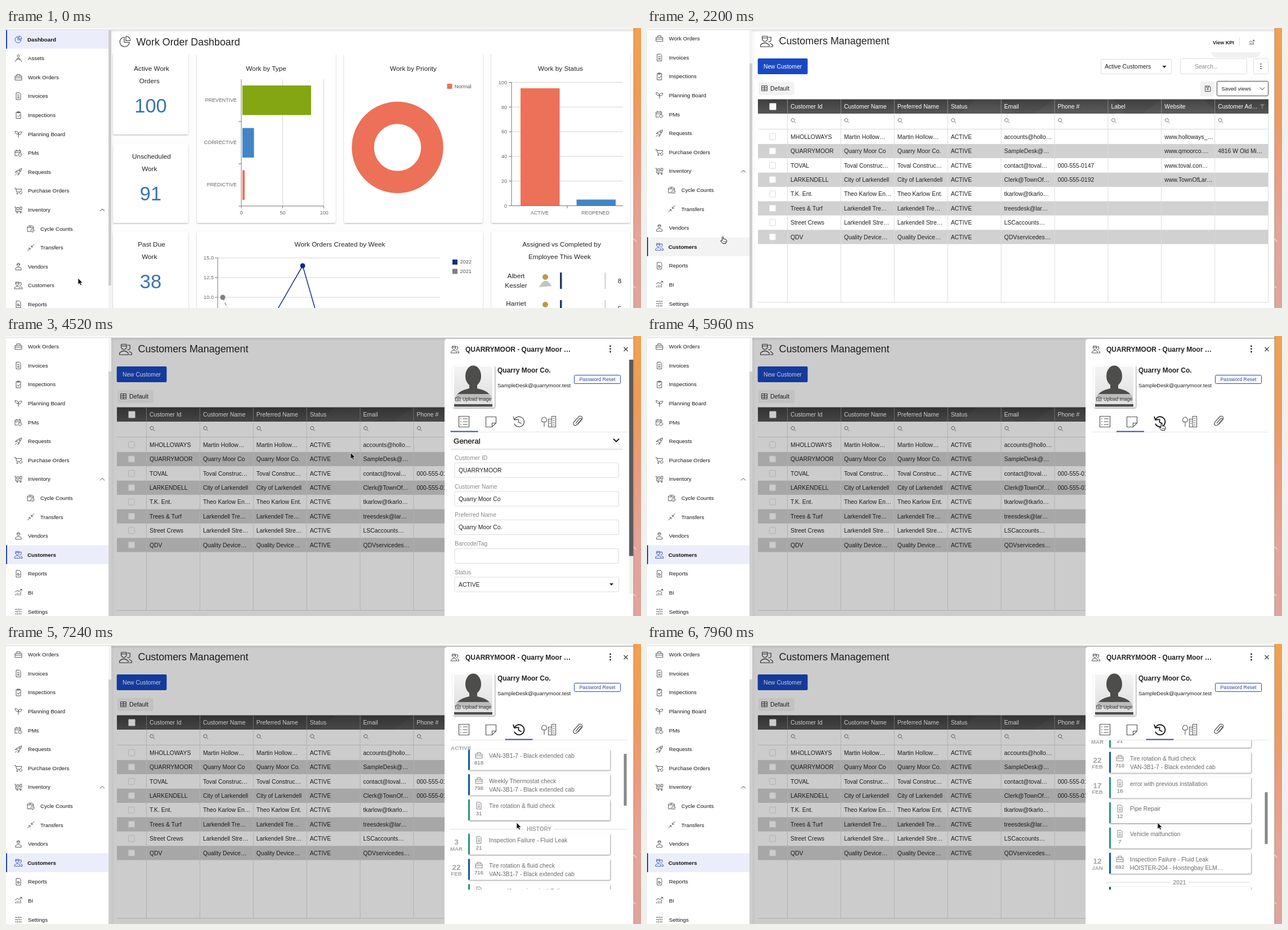
Recreate the animation shown at these times as an HTML page. Size 1128 px wide and 497 px high, loop 8000 ms.

```html
<!DOCTYPE html>
<html lang="en">
<head>
<meta charset="utf-8">
<title>Customer records</title>
<style>
html,body{margin:0;width:100%;height:100%;overflow:hidden;background:#fff}
svg{display:block;width:1128px;height:497px;font-family:"Liberation Sans",Arial,sans-serif}
</style>
</head>
<body>
<svg id="stage" viewBox="0 0 1128 497"></svg>
<script>
const LOOP = 8000;
const text = (x, y, s, size = 10.4, fill = '#222', extra = '') =>
  `<text x="${x}" y="${y + size * .36}" font-size="${size}" fill="${fill}" ${extra}>${s.replace(/&/g, '&amp;')}</text>`;
const mid = (x, y, s, size, fill, extra = '') => text(x, y, s, size, fill, 'text-anchor="middle" ' + extra);
const end = (x, y, s, size, fill) => text(x, y, s, size, fill, 'text-anchor="end"');
const bold = 'font-weight="700"';
const rect = (x, y, w, h, fill, extra = '') => `<rect x="${x}" y="${y}" width="${w}" height="${h}" fill="${fill}" ${extra}/>`;
const line = (d, stroke = '#888', w = 1, extra = '') => `<path d="${d}" fill="none" stroke="${stroke}" stroke-width="${w}" ${extra}/>`;
const group = (id, body, extra = '') => `<g id="${id}" ${extra}>${body}</g>`;
const range = n => [...Array(n).keys()];

const icons = {
  pie: 'M-1-5A5.5 5.5 0 1 0 5 1H-1ZM1-6A5 5 0 0 1 6-1H1Z',
  asset: 'M0-6a2 2 0 1 0 .1 0M-6 6L-2 0H2L6 6M-3 3L0 1L3 3',
  work: 'M-6-2H6V5H-6ZM-3-2V-5H3V-2M-6 1H6',
  doc: 'M-4-6H2L4-4V6H-4ZM-2-2H2M-2 1H2M-2 3H2',
  check: 'M-4-5H4V6H-4ZM-2-6H2V-4H-2ZM-2 1L0 3L3-1',
  plant: 'M0 6V0Q-6 1-6-5Q0-5 0 0Q0-4 6-4Q6 1 0 1',
  calendar: 'M4-1V-4H-6V5H-1M-6-1H4M-3-6V-3M2-6V-3M3 0a3 3 0 1 0 .1 0M3 2V3H4',
  rocket: 'M6-6Q0-5-3 0L0 3Q5 0 6-6ZM-3 0L-6 1L-2-3M0 3L-1 6L3 2M-6 6L-3 3M2-3a1 1 0 1 0 .1 0',
  cart: 'M-7-5H-5L-3 2H2M-4-3H6L5 0M-2 4a1 1 0 1 0 .1 0M4 1a2.3 2.3 0 1 0 .1 0',
  stock: 'M-7-5H-5V3H6M-3-4H1V0H-3ZM3-5H6V0H3ZM-2 4a1 1 0 1 0 .1 0M4 4a1 1 0 1 0 .1 0',
  cycle: 'M0 5H-6V-3L-4-5H3L5-3V0M-6-2H5M-1-5V-2M3 0a3 3 0 1 0 .1 0M2 3L3 4L5 2',
  transfer: 'M6-6L1-1M1-4V-1H4M-6 6L-1 1M-1 4V1H-4',
  person: 'M0-6a2.6 2.6 0 1 0 .1 0M-3-4H3M-5 6V3Q0-1 5 3V6Z',
  people: 'M-5-6H1V-2Q-2 2-5-2ZM-5-4H1M-7 6V4Q-2-1 3 4V6ZM2-5H5V-1Q4 1 2 0M4 2L7 4V6H4',
  report: 'M-4-6H2L4-4V6H-4ZM0-1a2 2 0 1 0 2 2H0Z',
  chart: 'M-5 5V2M-2 5V0M1 5V1M4 5V-2M-6-1L-2-4L1-2L6-6M3-6H6V-3',
  sliders: 'M-6-4H-1M2-4H6M-6 0H1M4 0H6M-6 4H-3M0 4H6M.5-5.5v3M2.5-1.5v3M-1.5 2.5v3'
};
const icon = (name, x, y, scale = 1, color = '#444') =>
  line(icons[name], color, .9 / Math.sqrt(scale), `transform="translate(${x} ${y}) scale(${scale})" stroke-linejoin="round"`);

// Sidebar
const menu = ['Dashboard pie', 'Assets asset', 'Work Orders work', 'Invoices doc', 'Inspections check', 'Planning Board plant',
  'PMs calendar', 'Requests rocket', 'Purchase Orders cart', 'Inventory stock', 'Cycle Counts cycle', 'Transfers transfer',
  'Vendors person', 'Customers people', 'Reports report', 'BI chart', 'Settings sliders'];
function menuItem(entry, i) {
  const cut = entry.lastIndexOf(' '), label = entry.slice(0, cut), y = 20.2 + 33.6 * i;
  const nested = i === 10 || i === 11;
  const plain = icon(entry.slice(cut + 1), nested ? 44 : 22, y) + text(nested ? 61 : 39, y, label, 9.7, '#18181c');
  if (i !== 0 && i !== 13) return plain;
  const active = rect(0, y - 17, 182, 33.5, '#ebeefa', `id="bg${i}"`) + rect(0, y - 17, 2, 33.5, '#2547b5') +
    icon(entry.slice(cut + 1), 22, y, 1, '#2547b5') + text(38, y, label, 9.75, '#111', bold);
  return group('plain' + i, plain) + group('active' + i, active);
}
const sidebar = rect(0, 3, 187, 494, '#fff') +
  `<g clip-path="url(#sideClip)">` +
  group('menu', menu.map(menuItem).join('') + line('M167 325L171 321L175 325', '#444')) + '</g>' +
  rect(182, 3, 5, 494, '#f3f3f3') + rect(182, 4, 5, 453, '#cdcdcf', 'id="sideThumb"');

// Dashboard
const card = (x, y, w, h) => rect(x, y, w, h, '#fff', 'rx="3" filter="url(#soft)"');
const stat = (y, a, b, n) => mid(258.5, y, a, 11.8) + mid(254.8, y + 21.5, b, 11.8) + mid(257, y + 66, n, 34.5, '#3b73ae');
const orange = '#ec7158', blue = '#4285c6', axis = '#777';
const employee = (y, first, last, n) => mid(906, y, first, 11.8) + mid(906, y + 17, last, 11.8) +
  `<circle cx="958" cy="${y + 2}" r="5" fill="#b79a4d"/><path d="M947 ${y + 20}Q958 ${y - 2} 969 ${y + 18}Z" fill="#c4c4c4"/>` +
  rect(984, y - 6, 3.5, 29, '#213c63') + rect(1063, y - 6, 3, 29, '#dddde9') + mid(1090, y + 9, n, 11.8);
const dashboard = rect(187, 3, 928, 494, '#fdfdfd') +
  card(190, 44, 134, 145) + card(190, 205, 134, 141) + card(190, 361, 134, 160) +
  [339, 600.5, 862].map(x => card(x, 44, 246.5, 302)).join('') + card(339, 361, 508, 160) + card(862, 361, 246.5, 160) +
  rect(187, 8, 928, 39, '#fff') + icon('pie', 211.5, 24, 1.55, '#333') + text(231.5, 25, 'Work Order Dashboard', 17.85) +
  stat(72, 'Active Work', 'Orders', '100') + stat(228, 'Unscheduled', 'Work', '91') + stat(384, 'Past Due', 'Work', '38') +
  mid(462, 72, 'Work by Type', 11.8) + mid(723.5, 72, 'Work by Priority', 11.8) + mid(985, 72, 'Work by Status', 11.8) +
  mid(593, 384, 'Work Orders Created by Week', 11.8) +
  mid(987, 384, 'Assigned vs Completed by', 11.8) + mid(983.5, 405.5, 'Employee This Week', 11.8) +
  line('M491.5 91V316M564.5 91V316', '#d4d4d4') +
  rect(420, 102, 122, 52.5, '#84a612') + rect(420, 177.5, 20.5, 52.5, blue) + rect(420, 252.5, 4, 52.5, orange) +
  line('M418 91V320M413 166H418M413 241H418M413 316H565M491.5 316V320M564.5 316V320', axis) +
  ['PREVENTIVE', 'CORRECTIVE', 'PREDICTIVE'].map((s, i) => end(410, 128 + 75 * i, s, 8.9, '#666')).join('') +
  ['0', '50', '100'].map((s, i) => mid(418 + 73.5 * i, 328, s, 9.1, '#666')).join('') +
  `<circle cx="695.5" cy="212" r="61.5" fill="none" stroke="${orange}" stroke-width="39.5"/>` +
  rect(783.5, 99, 9, 9, orange) + text(797, 104, 'Normal', 9.2, '#555') +
  range(5).map(i => line(`M898 ${96.5 + 43.8 * i}H1096`, '#d4d4d4')).join('') +
  range(6).map(i => line(`M893 ${96.5 + 43.8 * i}H898`, axis) + end(890, 96.5 + 43.8 * i, '' + (100 - 20 * i), 9.1, '#666')).join('') +
  rect(914, 107, 69.5, 208.5, orange) + rect(1013.5, 304.5, 69.5, 11, blue) +
  line('M898 96V315.5H1096M997 315V320', axis) +
  mid(948, 328, 'ACTIVE', 8.9, '#666') + mid(1047, 328, 'REOPENED', 8.9, '#666') +
  ['15.0', '12.5', '10.0'].map((s, i) => line(`M376 ${408 + 35 * i}H771`, '#d4d4d4') +
    line(`M371 ${408 + 35 * i}H376`, axis) + end(369, 408 + 35 * i, s, 9.2, '#666')).join('') +
  line('M376 408V497', axis) +
  line('M479 505L527 422L551 505', '#12307f', 1.5) + line('M385 478L395 502', '#888', 1.4, 'stroke-dasharray="6 4"') +
  '<circle cx="527" cy="422" r="4.5" fill="#12307f"/><circle cx="385" cy="478" r="4.5" fill="#808080"/>' +
  rect(793, 411, 9, 9, '#12307f') + text(806.5, 415, '2022', 9.2, '#555') +
  rect(793, 427.5, 9, 9, '#808080') + text(806.5, 432, '2021', 9.2, '#555') +
  employee(440, 'Albert', 'Kessler', '8') + employee(489, 'Harriet', 'Lowe', '5');

// Customers page
const colX = i => 249.5 + 94.9 * i;
const headers = ['Customer Id', 'Customer Name', 'Preferred Name', 'Status', 'Email', 'Phone #', 'Label', 'Website', 'Customer Ad…'];
const customers = [
  'MHOLLOWAYS|Martin Hollow…|Martin Hollow…|accounts@hollo…|||www.holloways_…',
  'QUARRYMOOR|Quarry Moor Co|Quarry Moor Co.|SampleDesk@…|||www.qmoorco.…|4816 W Old Mi…',
  'TOVAL|Toval Construc…|Toval Construc…|contact@toval…|000-555-0147||www.toval.con…',
  'LARKENDELL|City of Larkendell|City of Larkendell|Clerk@TownOf…|000-555-0192||www.TownOfLar…',
  'T.K. Ent.|Theo Karlow En…|Theo Karlow Ent.|tkarlow@tkarlo…',
  'Trees & Turf|Larkendell Tre…|Larkendell Tre…|treesdesk@lar…',
  'Street Crews|Larkendell Stre…|Larkendell Stre…|LSCaccounts…',
  'QDV|Quality Device…|Quality Device…|QDVservicedes…'
];
function customerRow(row, i) {
  const cells = row.split('|'), y = 193 + 25.4 * i;
  cells.splice(3, 0, 'ACTIVE');
  return (i % 2 ? rect(197, y - 12.5, 907, 25.2, '#d1d1d1') : '') +
    rect(217.5, y - 5.5, 11, 11, '#fff', `rx="1" stroke="${i % 2 ? '#e4e4e4' : '#ddd'}"`) +
    cells.map((s, c) => text(colX(c) + 5.5, y, s)).join('');
}
const columnLines = range(10).map(i => `M${colX(i)} 152V487`).join('');
const customersPage = rect(187, 3, 928, 494, '#fff') + icon('people', 212.5, 24, 1.55, '#333') +
  text(234.5, 23, 'Customers Management', 17.9) +
  group('tools',
    rect(196.7, 54, 88.7, 28, '#1949c2', 'rx="2"') + mid(241, 68, 'New Customer', 10.3, '#fff') +
    rect(198, 96, 64, 23, '#f2f2f2', 'rx="4"') +
    line('M203.5 102.5h10v9h-10zM203.5 105.5h10M203.5 108.5h10M208.5 102.5v9', '#444') + text(219, 107.5, 'Default', 10.7) +
    text(1005, 25.5, 'View KPI', 9, '#222', bold) + line('M1052.5 16V33', '#ddd') + icon('chart', 1074, 26, .75, '#333') +
    '<path d="M1002 43H1090Q1088 53 1076 53H1016Q1004 53 1002 43Z" fill="#f1f1f1"/>' +
    rect(806.5, 55.5, 125, 26, '#fff', 'rx="2" stroke="#ddd"') + text(813, 68.5, 'Active Customers', 10.5) +
    '<path d="M915.5 67h7l-3.5 4z" fill="#222"/>' +
    rect(947.5, 54.5, 118, 27, '#fff', 'rx="2" stroke="#ddd"') + text(973, 68, 'Search...', 10.3, '#888') +
    rect(1077.5, 54.5, 26, 27, '#fff', 'rx="2" stroke="#ddd"') +
    [64, 68, 72].map(y => `<circle cx="1090.5" cy="${y}" r="1" fill="#222"/>`).join('') +
    rect(983, 95, 25, 26, '#f1f1f1', 'id="saveHover" rx="3"') +
    line('M991.5 103h7.5l2 2v7.5h-9.5zM994 103v3h4v-3M996 107.5a1.3 1.3 0 1 0 .1 0', '#444') +
    rect(1012.5, 94.5, 91, 26, '#fff', 'rx="2" stroke="#444"') + text(1020.5, 108, 'Saved views', 9.4) +
    line('M1089 105.5L1093 109.5L1097 105.5', '#333') +
    rect(197, 126.5, 907, 25.5, 'url(#head)') +
    '<path d="M555 152L585 127H629L655 152ZM688 152L722 127H830L850 152ZM880 152L915 127H990L1015 152Z" fill="#fff" opacity=".03"/>' +
    line(range(9).map(i => `M${colX(i)} 127V152`).join(''), '#8a8a8a') +
    rect(217.5, 133.5, 12, 12, '#fff', 'rx="1"') +
    '<path d="M1088.5 135h9l-3.5 4v5l-2-1v-4z" fill="#777"/>' +
    headers.map((s, i) => text(colX(i) + 5.5, 139.5, s, 10.4, '#fff') +
      line(`M${colX(i) + 12.3} 164.8a3 3 0 1 0-1 1.2M${colX(i) + 11.5} 165.5l3 3`, '#666')).join('')) +
  group('rows', customers.map(customerRow).join('')) +
  group('gridLines', line(columnLines, '#dcdcdc') + line('M197 179.5H1104M197 487H1104', '#d8d8d8'));

// Detail panel
const cameraIcon = line('M798.5 109.5h2l1-1.5h3l1 1.5h1.5v5.5h-8.5zM803 110.5a1.6 1.6 0 1 0 .1 0', '#333', .8);
const field = (y, label, value) => text(797, y - 22, label, 10.4, '#8a8a8a') +
  rect(797, y - 13, 291.5, 26, '#fff', 'rx="2" stroke="#ddd"') + text(804, y, value);
const tabs = line('M804.5 142.5h18v19h-18zM807 147h2M811.5 147h8.5M807 152h2M811.5 152h8.5M807 157h2M811.5 157h8.5', '#555', 1.2) +
  line('M852.5 143.5h18v11l-7 7h-11zM870.5 154.5h-7v7', '#555', 1.2) +
  line('M903.5 148A9 9 0 1 1 903 155.5M901 143l2 6 6-1M910.5 147v6l5 2.5', '#555', 1.3, 'id="clock"') +
  line('M956 161v-9M953 152.5q-3-3 0-7q3-3 6 0q3 4 0 7zM963.5 161.5v-14h6v14zM969.5 161.5v-19h7v19zM965 151h3M965 155h3M971.5 146h3M971.5 150h3M971.5 154h3M971.5 158h3', '#555', 1.1) +
  line('M1012 155l7-8.5q2-1.5 3 .5q.5 1-7.5 10q-3 3-5.5 1q-2.5-2.5 0-5.5l8.5-9.5q3-2 5.5.5q2 2.5-.5 5.5l-7 8', '#555', 1.2);
const avatar = rect(793, 52, 75, 75, '#fff', 'rx="3" filter="url(#lift)"') + rect(796, 54, 68, 71, 'url(#photo)') +
  '<ellipse cx="830" cy="71" rx="14" ry="18.5" fill="#4d4d4b"/><path d="M823 80H837V93Q861 98 863 112H797Q800 98 823 93Z" fill="#4d4d4b"/>' +
  rect(796, 103, 68, 19, '#e2e2e2', 'opacity=".75"') + rect(796, 121, 68, 4.5, '#4d4d4d') +
  cameraIcon + text(811, 112, 'Upload Image', 8.2);
const form = text(795, 186, 'General', 13.4, '#111', 'stroke="#111" stroke-width=".25"') +
  line('M1079 182.5L1084 187.5L1089 182.5', '#111', 1.8) +
  rect(790, 200, 306, 1, '#ddd') + rect(790, 201, 306, 2, '#f3f3f3') +
  field(238, 'Customer ID', 'QUARRYMOOR') + field(289, 'Customer Name', 'Quarry Moor Co') +
  field(339.5, 'Preferred Name', 'Quarry Moor Co.') + field(390.5, 'Barcode/Tag', '') + field(441, 'Status', 'ACTIVE') +
  '<path d="M1072 439h7l-3.5 4z" fill="#222"/>' +
  rect(1107, 42, 7.5, 416, '#efefef') + rect(1107, 42, 7.5, 348.5, '#5b5b5b');

// History entries: y, kind, id, first line, second line, day, month
const history = [
  [198.5, 'work', 818, 'VAN-3B1-7 - Black extended cab'],
  [243.3, 'work', 798, 'Weekly Thermostat check', 'VAN-3B1-7 - Black extended cab'],
  [288, 'doc', 31, 'Tire rotation & fluid check'],
  [348.8, 'doc', 21, 'Inspection Failure - Fluid Leak', '', '3', 'MAR'],
  [393.5, 'work', 716, 'Tire rotation & fluid check', 'VAN-3B1-7 - Black extended cab', '22', 'FEB'],
  [438.3, 'doc', 16, 'error with previous installation', '', '17', 'FEB'],
  [483, 'doc', 12, 'Pipe Repair'],
  [527.8, 'doc', 7, 'Vehicle malfunction'],
  [572.6, 'work', 692, 'Inspection Failure - Fluid Leak', 'HOISTER-204 - Hoistingbay ELM…', '12', 'JAN'],
  [633, 'work', 688, 'Weekly Thermostat check']
];
const grey = '#a3a3a3';
const entry = ([y, kind, id, a, b = '', day = '', month = '']) =>
  rect(821, y - 11.5, 252, 37, '#fff', 'rx="2" filter="url(#lift)"') +
  rect(821, y - 11.5, 3, 37, kind === 'work' ? '#0e58a3' : '#2a957f') +
  icon(kind, 840, y - .5, 1, '#777') + mid(840, y + 13, '' + id, 9.6, '#666') +
  text(858, y, a, 10.4, '#6c6c6c') + text(858, y + 15, b, 10.4, '#6c6c6c') +
  mid(800, y + 3, day, 13.5, grey, bold) + mid(800, y + 15, month, 9.7, grey, bold);
const historyList = history.map(entry).join('') + text(790, 184.5, 'ACTIVE', 9.9, grey, bold) +
  line('M790 329.5H920M973 329.5H1104', '#dadada') + mid(947, 329, 'HISTORY', 10, grey, bold) +
  line('M815 613.5H930M962 613.5H1070', '#dadada') + mid(946, 613.5, '2021', 10.4, grey, bold);

const panel = rect(779, 5, 345, 500, '#fff', 'rx="5"') + line('M1097.5 20l7 7M1104.5 20l-7 7', '#333', 1.1) +
  group('detail',
    icon('people', 797.5, 24, 1, '#333') + text(816, 23.5, 'QUARRYMOOR - Quarry Moor …', 12, '#222', bold) +
    [18, 23, 28].map(y => `<circle cx="1073.5" cy="${y}" r="1.4" fill="#222"/>`).join('') +
    avatar + text(873, 61, 'Quarry Moor Co.', 12, '#222', bold) + text(873, 88, 'SampleDesk@quarrymoor.test', 9.55) +
    rect(1009.5, 69.5, 82, 15, '#fff', 'rx="2" stroke="#2a479b"') + mid(1050.5, 77, 'Password Reset', 8.8, '#2a479b') +
    tabs + line('M790 170.5H1104', '#e4e4e4') + rect(0, 168.5, 49, 2, '#3f51a8', 'id="tabBar"') +
    group('form', form) +
    group('history', `<g clip-path="url(#listClip)">${group('list', historyList)}</g>` +
      rect(1097.5, 171, 5, 92, '#888', 'id="listThumb" rx="1"')));

const arrow = '<path d="M0 0V11.5L2.6 9.2L4.5 13L6.5 12L4.7 8.5H8.2Z" fill="#111" stroke="#fff" stroke-width=".7"/>';
const hand = '<path d="M-1 1Q0-1 1.2 1V4.5Q6.5 4.5 7 6.5V9L5.5 12.5H0L-3.5 8Q-4 6.5-1 7.5Z" fill="#fff" stroke="#111"/>' +
  line('M1.5 8v2.5M3.3 8v2.5M5 8v2.5', '#111', .6);
const gradient = (id, ...stops) => `<linearGradient id="${id}" x2="0" y2="1">` +
  stops.map((c, i) => `<stop offset="${i / (stops.length - 1)}" stop-color="${c}"/>`).join('') + '</linearGradient>';
const shadow = (id, dx, opacity) => `<filter id="${id}" x="-10%" y="-10%" width="120%" height="130%">` +
  `<feDropShadow dx="${dx}" dy="1.2" stdDeviation="1.1" flood-opacity="${opacity}"/></filter>`;

stage.innerHTML = '<defs>' + gradient('head', '#3e3e3e', '#565656') + gradient('photo', '#f4f4f4', '#dcdcdc') +
  gradient('desk', '#f2a14f', '#f09a58', '#eb9c7f', '#e3a59b', '#dfa49c') + gradient('top', '#e2e2e2', '#fff') +
  shadow('soft', 0, .28) + shadow('lift', .8, .45) +
  '<clipPath id="sideClip"><path d="M0 3H182V497H0Z"/></clipPath><clipPath id="listClip"><path d="M785 171H1104V436H785Z"/></clipPath></defs>' +
  rect(0, 0, 1128, 497, '#fff') + group('dashboard', dashboard) + group('customers', customersPage) +
  rect(187, 3, 928, 5, 'url(#top)') + rect(187, 3, 4, 494, '#000', 'opacity=".025"') +
  rect(187, 3, 928, 494, '#000', 'id="shade"') + group('panel', panel) + sidebar +
  rect(0, 0, 1115, 3, '#f8f8f8') + rect(0, 2.5, 1115, 1, '#dcdcdc') +
  rect(1115, 0, 13, 497, 'url(#desk)') + rect(1114.5, 0, 1, 497, '#a98375') +
  line('M1115 374L1119 379M1115 458L1118 462', '#eee', 1.2) +
  group('cursor', group('arrow', arrow) + group('hand', hand));

const $ = id => document.getElementById(id);
const set = (id, name, value) => $(id).setAttribute(name, value);
const show = (id, on) => set(id, 'visibility', on ? 'inherit' : 'hidden');
const part = (t, a, b) => Math.min(1, Math.max(0, (t - a) / (b - a)));
const smooth = p => p * p * (3 - 2 * p);
const easeOut = p => 1 - (1 - p) ** 2;

// Pointer stops: time, x, y
const path = [[480, 128, 444], [1040, 134.5, 370], [2240, 134.5, 370], [2400, 201, 343], [2560, 385, 284], [2880, 385, 284],
  [3300, 489, 205], [3640, 483, 220], [4240, 483, 220], [4520, 612, 207], [4680, 926, 190], [4880, 926, 190],
  [5280, 813, 150], [5640, 860, 153], [5740, 860, 153], [5920, 914, 155], [6560, 914, 155], [6920, 907, 317]];
function pointer(t) {
  const i = path.findIndex(k => k[0] > t);
  if (i === 0) return path[0].slice(1);
  if (i < 0) return path[path.length - 1].slice(1);
  const [a, b] = [path[i - 1], path[i]], p = smooth(part(t, a[0], b[0]));
  return [a[1] + (b[1] - a[1]) * p, a[2] + (b[2] - a[2]) * p];
}

function draw(t) {
  const scroll = easeOut(part(t, 40, 320));
  set('menu', 'transform', `translate(0 ${-68.6 * scroll})`);
  set('sideThumb', 'y', 4 + 59 * scroll);
  const opened = t >= 1600;
  show('plain0', opened); show('active0', !opened);
  show('plain13', !opened); show('active13', opened);
  set('bg13', 'fill', t < 2360 ? '#f3f3f4' : '#ebeefa');

  show('dashboard', t < 1720);
  show('customers', t >= 1720);
  show('tools', t >= 1880);
  show('gridLines', t >= 1880);
  show('rows', t >= 2040);
  show('saveHover', t >= 1880 && t < 2400);

  const slide = easeOut(part(t, 3780, 4120));
  set('shade', 'opacity', .2 * slide);
  set('panel', 'transform', `translate(${336 * (1 - slide)} 0)`);
  show('panel', slide > 0);
  const detail = t >= 4320;
  show('detail', detail);
  show('form', detail && t < 5760);
  show('history', t >= 6360);
  set('tabBar', 'x', 789.5 + 44.5 * smooth(part(t, 5740, 5900)) + 52.5 * smooth(part(t, 6160, 6320)));
  const dark = t >= 5880;
  set('clock', 'stroke', dark ? '#111' : '#555');
  set('clock', 'stroke-width', dark ? 1.8 : 1.3);

  const listY = 67 * part(t, 7080, 7240) ** 1.6 + 190.5 * easeOut(part(t, 7240, 7960));
  set('list', 'transform', `translate(0 ${67 - listY})`);
  set('listThumb', 'y', 171 + .357 * listY);

  const [x, y] = pointer(t);
  const pointing = (t > 5000 && y < 168) || (t > 900 && x < 182);
  set('cursor', 'transform', `translate(${x} ${y})`);
  show('hand', pointing);
  show('arrow', !pointing);
}
function frame() {
  draw(performance.now() % LOOP);
  requestAnimationFrame(frame);
}
frame();
</script>
</body>
</html>
```
